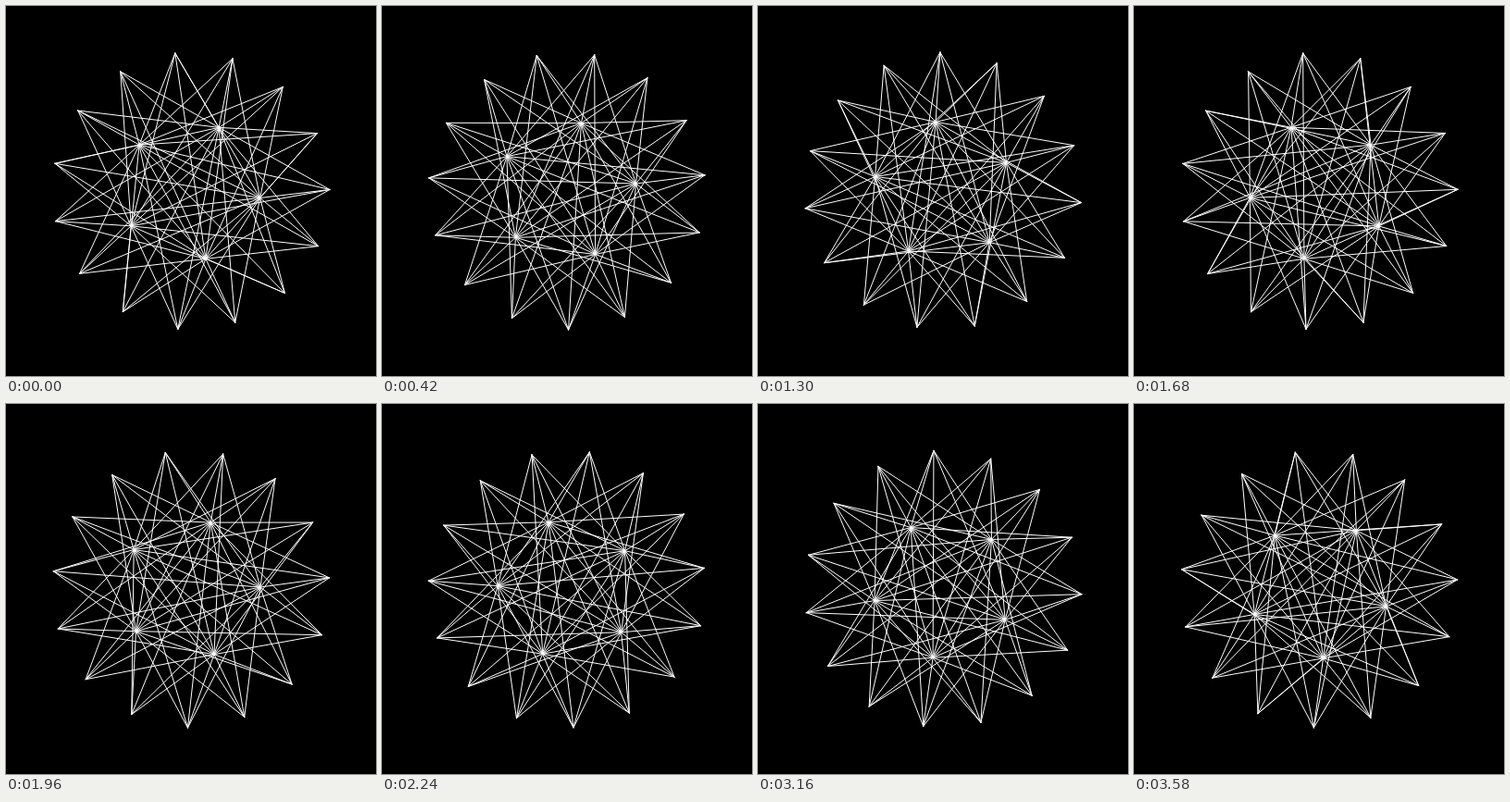
An HTML page with a canvas for the animation above (3600 ms loop, 400 px wide and 400 px high).

```html
<!DOCTYPE html>
<html lang="en">
<head>
<meta charset="utf-8">
<title>Rotating star of lines</title>
<style>
  html, body { margin: 0; height: 100%; overflow: hidden; background: #000; }
  canvas { display: block; }
</style>
</head>
<body>
<canvas id="stage" width="400" height="400"></canvas>
<script>
const ctx = document.getElementById('stage').getContext('2d');
const LOOP = 3600, STEP = 20, CENTER = 200;

// Evenly spaced points on a circle, turned by a given angle in radians
function ring(count, radius, turn) {
  return Array.from({ length: count }, (_, i) => {
    const a = turn + i * 2 * Math.PI / count;
    return [CENTER + radius * Math.cos(a), CENTER + radius * Math.sin(a)];
  });
}

function draw(now) {
  const tick = Math.floor(now % LOOP / STEP) + 2;
  const outer = ring(15, 150, -0.005 * tick);
  const inner = ring(5, 75, 0.05 * tick);

  ctx.fillStyle = '#000';
  ctx.fillRect(0, 0, 400, 400);
  ctx.strokeStyle = '#fff';
  ctx.lineWidth = 1;
  ctx.lineCap = 'round';
  for (const from of inner) {
    for (const to of outer) {
      ctx.beginPath();
      ctx.moveTo(...from);
      ctx.lineTo(...to);
      ctx.stroke();
    }
  }
}

function loop(now) {
  draw(now);
  requestAnimationFrame(loop);
}
draw(0);
requestAnimationFrame(loop);
</script>
</body>
</html>
```
